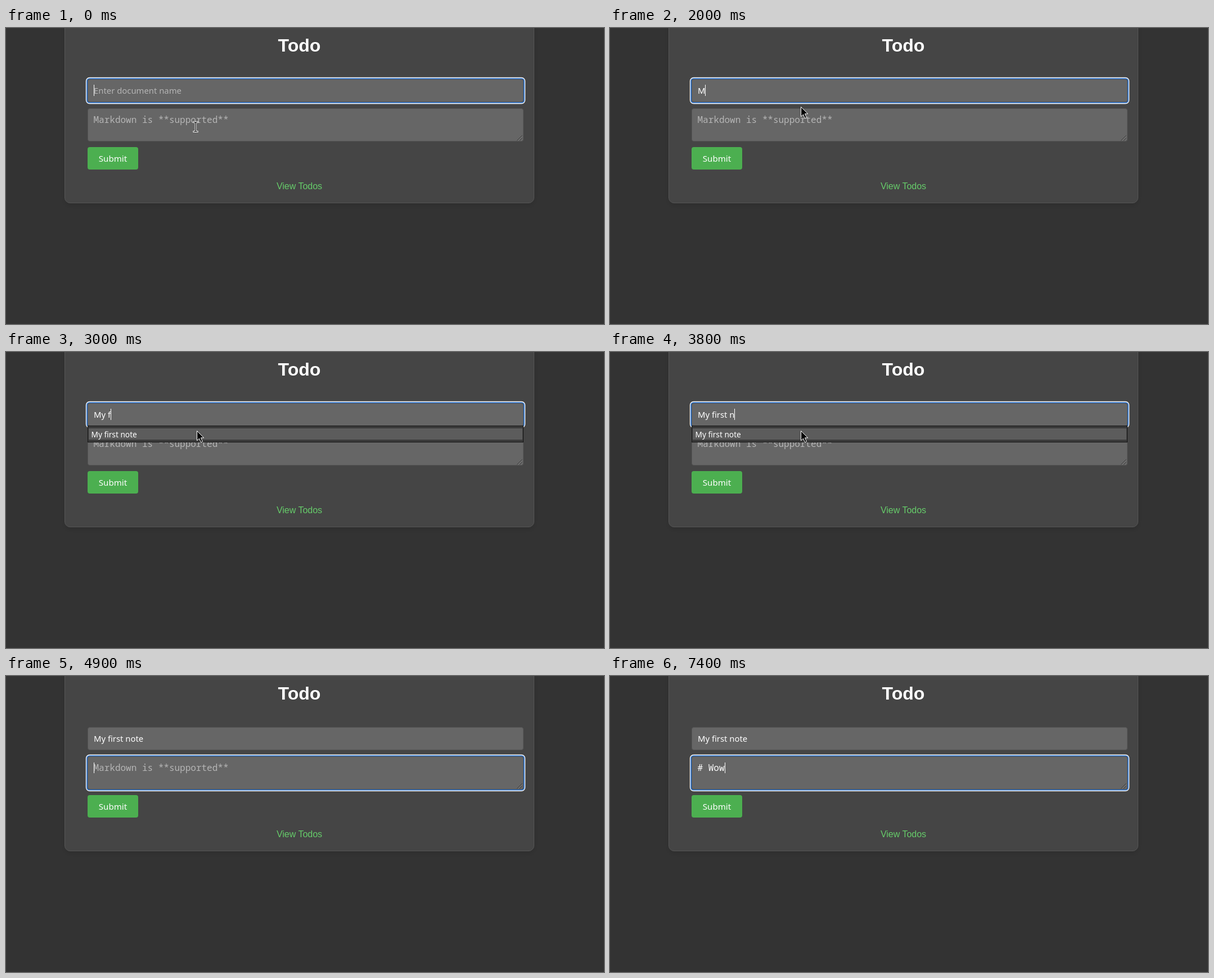
Write an HTML page that moves like this. It is 1063x527 px and loops after 8 s.

```html
<!DOCTYPE html>
<html lang="en">
<head>
<meta charset="utf-8">
<title>Todo form</title>
<style>
  html, body { margin: 0; width: 100%; height: 100%; overflow: hidden; background: #333; }
  svg { display: block; }
  text { white-space: pre; fill: #fff; }
  .arial { font-family: "Liberation Sans", Arial, sans-serif; }
  .ui { font-family: "Noto Sans", sans-serif; font-size: 14.85px; }
  .mono { font-family: "Noto Sans Mono", monospace; font-size: 16px; }
  .item { font-size: 13.7px; }
  .hint { fill: #b5b5b5; }
  .field { fill: #666; stroke: #555; }
  .caret { fill: #fff; }
  .ring rect { fill: none; }
</style>
</head>
<body>
<svg width="1063" height="527" viewBox="0 0 1063 527">
  <defs>
    <filter id="shadow" x="-5%" y="-5%" width="110%" height="115%">
      <feDropShadow dx="0" dy="4" stdDeviation="4" flood-color="#000" flood-opacity=".1"/>
    </filter>
  </defs>
  <rect width="1063" height="527" fill="#333"/>
  <rect x="104.5" y="-40.5" width="834" height="352" rx="9.5" fill="#444" stroke="#555" filter="url(#shadow)"/>
  <text class="arial" x="521.5" y="42" font-size="32" font-weight="700" text-anchor="middle">Todo</text>

  <rect class="field" x="145.5" y="91.5" width="774" height="40" rx="3.5"/>
  <rect class="field" x="145.5" y="143.5" width="774" height="58" rx="3.5"/>
  <path d="M908.5 200.5l9-9M913.5 200.5l4-4" stroke="#2c2c2c" fill="none"/>
  <path d="M909.5 200.5l8-8M914.5 200.5l3-3" stroke="#999" stroke-width=".6" fill="none"/>

  <g class="ring" id="ring">
    <rect id="ringInner" x="144" width="777" rx="4.5" stroke="#2f72c8" stroke-width="2"/>
    <rect id="ringOuter" x="142.5" width="780" rx="6" stroke="#fff" stroke-width="1.3"/>
  </g>

  <text class="ui" id="nameText" x="156" y="117"></text>
  <text class="mono" id="bodyText" x="155.5" y="169"></text>
  <rect class="caret" id="nameCaret" y="101" width="1" height="20"/>
  <rect class="caret" id="bodyCaret" y="154" width="1" height="19"/>

  <rect x="145" y="212" width="90" height="40" rx="4" fill="#4caf50"/>
  <text class="ui" x="190" y="238" text-anchor="middle" style="font-size:15.1px">Submit</text>
  <text class="arial" x="521.5" y="287" font-size="16" text-anchor="middle" style="fill:#66cc6a">View Todos</text>

  <g id="popup">
    <rect id="popupBox" x="145.5" y="131.5" width="774" fill="#3a3a3a" stroke="#161616"/>
    <rect x="147" y="136" width="771" height="20" fill="#5c5c5c"/>
    <text class="ui item" id="item0" x="151.5" y="152"></text>
    <text class="ui item" id="item1" x="151.5" y="172"></text>
  </g>

  <g id="beam" fill="none" stroke-linecap="square">
    <path d="M-3 -8.5h2l1 1 1 -1h2M0 -7.5v15M-3 8.5h2l1 -1 1 1h2" stroke="#fff" stroke-width="3"/>
    <path d="M-3 -8.5h2l1 1 1 -1h2M0 -7.5v15M-3 8.5h2l1 -1 1 1h2" stroke="#000" stroke-width="1.2"/>
  </g>
  <path id="arrow" d="M339.5 140.5v17.2l4-3.7 3 6.8 2.9-1.3-3-6.7h5.3z" fill="#000" stroke="#fff"/>
</svg>
<script>
const LOOP = 8000;
const $ = id => document.getElementById(id);
const set = (id, attrs) => { for (const k in attrs) $(id).setAttribute(k, attrs[k]); };
const show = (id, on) => set(id, { visibility: on ? "visible" : "hidden" });

const nameKeys = [
  [0, ""], [1300, "M"], [1700, ""], [2000, "M"], [2300, "M "], [2400, "M"],
  [2700, "My"], [2800, "My "], [3000, "My f"], [3100, "My fi"], [3200, "My fir"],
  [3400, "My firs"], [3500, "My first"], [3600, "My first "], [3800, "My first n"],
  [4100, "My first no"], [4400, "My first not"], [4500, "My first note"]
];
const bodyKeys = [[0, ""], [6400, "#"], [6900, "# "], [7100, "# W"], [7300, "# Wo"], [7400, "# Wow"]];
const beamKeys = [[0, [337, 176]], [100, [339, 168]], [200, [341, 160]]];
const docs = ["My cool new doc", "My first note"];
const FOCUS_BODY = 4900;

const at = (keys, t) => keys.filter(k => k[0] <= t).pop()[1];
const between = (t, a, b) => t >= a && t < b;

const pen = document.createElement("canvas").getContext("2d");
function textWidth(font, text) {
  pen.font = font;
  return pen.measureText(text).width;
}

function drawField(id, text, hint) {
  $(id).textContent = text || hint;
  $(id).classList.toggle("hint", !text);
}

function draw(t) {
  const name = at(nameKeys, t), body = at(bodyKeys, t);
  const inBody = t >= FOCUS_BODY;

  drawField("nameText", name, "Enter document name");
  drawField("bodyText", body, "Markdown is **supported**");

  const top = inBody ? 140 : 88, height = inBody ? 65 : 47;
  set("ringOuter", { y: top + .5, height: height - 1 });
  set("ringInner", { y: top + 2, height: height - 4 });

  set("nameCaret", { x: Math.floor(156.2 + textWidth('14.85px "Noto Sans", sans-serif', name)) });
  set("bodyCaret", { x: Math.floor(156 + textWidth('16px "Noto Sans Mono", monospace', body)) });
  show("nameCaret", !inBody && !between(t, 1100, 1300) && t < 4700);
  show("bodyCaret", inBody && !between(t, 6100, 6400));

  const matches = docs.filter(d => d.startsWith(t < 3000 ? "M" : name));
  show("popup", between(t, 2100, FOCUS_BODY));
  set("popupBox", { height: 9 + 20 * matches.length });
  $("item0").textContent = matches[0] || "";
  $("item1").textContent = matches[1] || "";

  set("beam", { transform: `translate(${at(beamKeys, t)})` });
  show("beam", t < 300);
  show("arrow", between(t, 300, FOCUS_BODY));
}

const start = performance.now();
function tick() {
  draw((performance.now() - start) % LOOP);
  requestAnimationFrame(tick);
}
tick();
</script>
</body>
</html>
```
